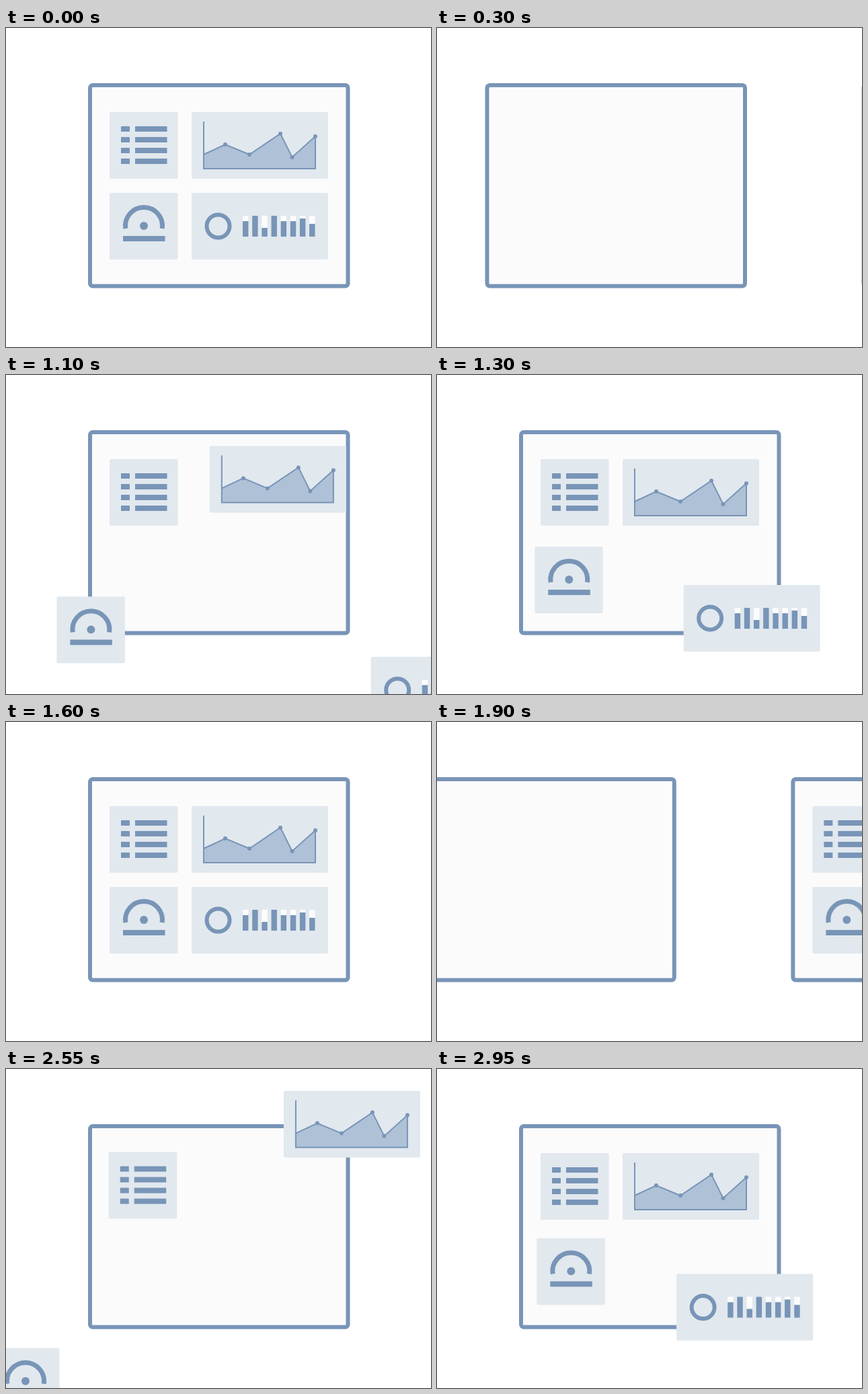
Write an HTML page that moves like this. It is 632 by 474 pixels and loops after 3000 ms.

```html
<!DOCTYPE html>
<html lang="en">
<head>
<meta charset="utf-8">
<title>Dashboard assembly</title>
<style>
  html, body { margin: 0; width: 100%; height: 100%; overflow: hidden; background: #fff; }
  svg { display: block; width: 632px; height: 474px; }
  .panel { fill: #fbfbfc; stroke: #7895b7; stroke-width: 6; }
  .card { fill: #e1e8ee; }
  .ink { fill: #7895b7; }
  .line { fill: none; stroke: #7895b7; }
  .area { fill: #afc1d7; }
  .track { fill: #fcfcfd; }
</style>
</head>
<body>
<svg viewBox="0 0 632 474">
  <defs>
    <rect id="panel" class="panel" x="125" y="85" width="383.5" height="298.5" rx="4"/>
  </defs>
  <g id="next"><use href="#panel"/></g>
  <g id="board">
    <use href="#panel"/>
    <g id="list">
      <rect class="card" x="154" y="125" width="101.5" height="99" rx="2"/>
    </g>
    <g id="chart">
      <rect class="card" x="276" y="125" width="203" height="99" rx="2"/>
    </g>
    <g id="gauge">
      <rect class="card" x="154" y="245" width="101.5" height="99" rx="2"/>
      <path class="line" stroke-width="7" d="M177.8 298A27.5 27.5 0 1 1 232.2 298"/>
      <circle class="ink" cx="205" cy="294" r="6"/>
      <rect class="ink" x="174" y="309" width="62.5" height="8" rx=".5"/>
    </g>
    <g id="bars">
      <rect class="card" x="276" y="245" width="203" height="99" rx="2"/>
      <circle class="line" stroke-width="6" cx="315.5" cy="294.5" r="17"/>
    </g>
  </g>
</svg>
<script>
const LOOP = 3000, CYCLE = 1635, STEP = 50;
const SLIDE_FROM = 124, SLIDE_TO = 340, SPACING = 560;
const byId = id => document.getElementById(id);

function add(parent, tag, attrs) {
  const el = document.createElementNS('http://www.w3.org/2000/svg', tag);
  for (const key in attrs) el.setAttribute(key, attrs[key]);
  parent.append(el);
}
const rect = (parent, cls, x, y, width, height) =>
  add(parent, 'rect', { class: cls, x, y, width, height, rx: .5 });

for (let i = 0; i < 4; i++) {
  const y = 146 + 16 * i;
  rect(byId('list'), 'ink', 171, y, 13, 8);
  rect(byId('list'), 'ink', 192, y, 47.5, 8);
}

const peaks = [[294, 188], [326, 173], [362, 188], [408, 157], [425.5, 192], [460, 161]];
const outline = 'M294 209L' + peaks.join('L') + 'L460 209Z';
add(byId('chart'), 'path', { class: 'area', d: outline });
add(byId('chart'), 'path', { class: 'line', 'stroke-width': 2, d: outline + 'M294 139V209' });
for (const [cx, cy] of peaks.slice(1)) add(byId('chart'), 'circle', { class: 'ink', cx, cy, r: 3 });

[23, 31, 13, 31, 23, 23, 27, 19].forEach((h, i) => {
  const x = 352 + 14.15 * i;
  rect(byId('bars'), 'track', x, 279, 8.5, 31);
  rect(byId('bars'), 'ink', x, 310 - h, 8.5, h);
});

// Each card lands along a parabola: landing time, direction, bend
const flights = {
  list: { land: 925, dir: [-326, -385], bend: [0, 110] },
  chart: { land: 1202, dir: [204, -152], bend: [35, 0] },
  gauge: { land: 1360, dir: [-150, 174], bend: [0, -25] },
  bars: { land: 1490, dir: [277, 217], bend: [0, -38] }
};

function offset({ land, dir, bend }, t) {
  const far = (Math.max(0, land - t) / 400) ** 1.5;
  return dir.map((d, i) => far * (d + far * bend[i]));
}

function place(id, x, y) {
  byId(id).setAttribute('transform', `translate(${x} ${y})`);
}

function draw(time) {
  // Motion advances in 50 ms steps
  const t = Math.floor(((time + 2) % LOOP) / STEP) * STEP;
  const phase = t < 1700 ? t : t - CYCLE;
  const flying = phase >= SLIDE_TO;
  const u = Math.min(1, Math.max(0, (phase - SLIDE_FROM) / (SLIDE_TO - SLIDE_FROM)));
  const shift = flying ? 0 : SPACING * u * u * (3 - 2 * u);
  place('board', shift, 0);
  place('next', shift - SPACING, 0);
  for (const id in flights) place(id, ...(flying ? offset(flights[id], phase) : [0, 0]));
}

const start = performance.now();
function tick() {
  draw(performance.now() - start);
  requestAnimationFrame(tick);
}
tick();
</script>
</body>
</html>
```
